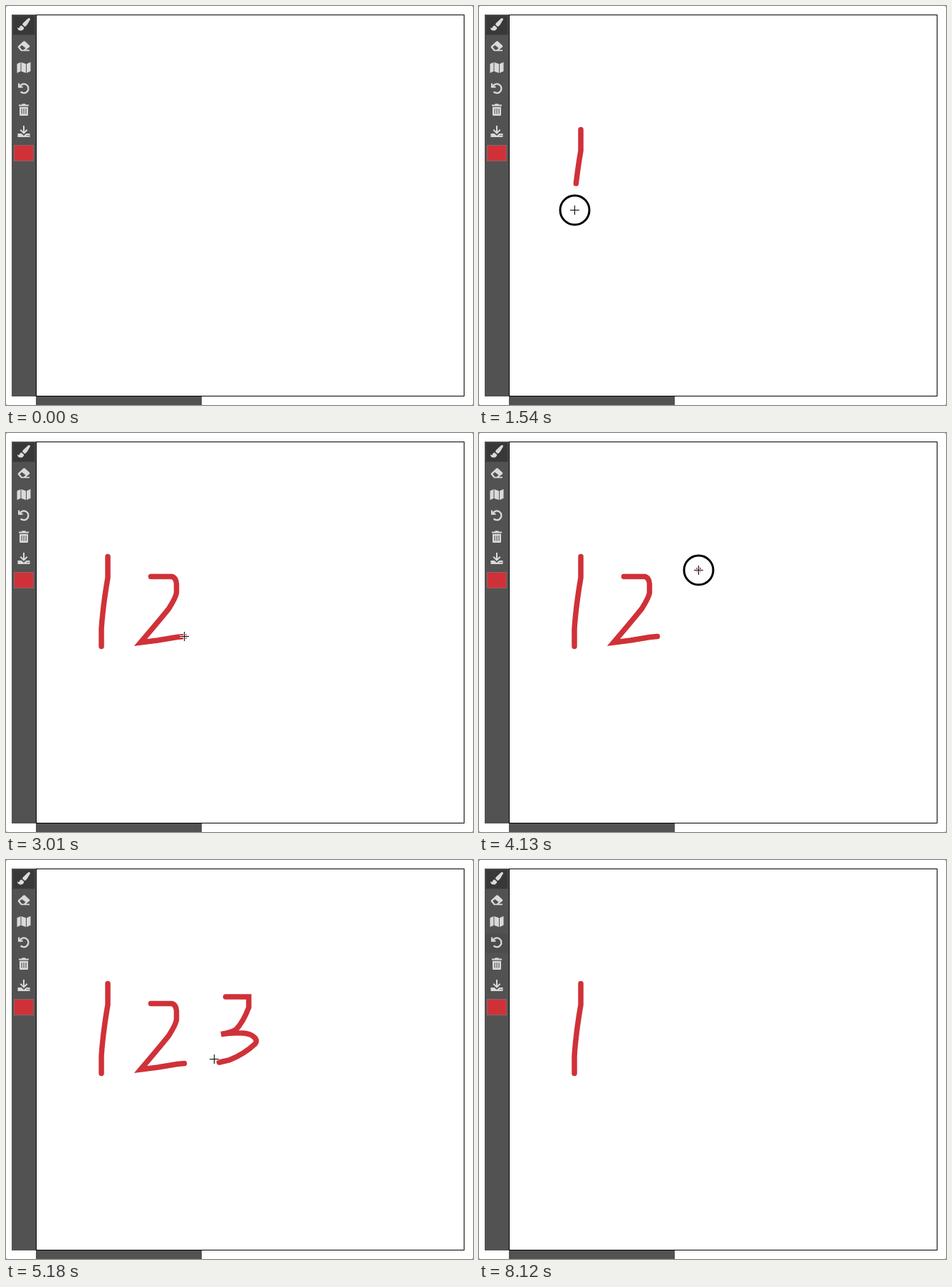
Write an HTML page that moves like this. It is 656 px wide and 560 px high and loops after 8.68 s.

```html
<!DOCTYPE html>
<html lang="en">
<head>
<meta charset="utf-8">
<title>Drawing board</title>
<style>
html, body { margin: 0; width: 100%; height: 100%; overflow: hidden; background: #fff; }
svg { display: block; width: 656px; height: 560px; }
.icon { fill: #dadada; fill-rule: evenodd; }
.button { fill: #383838; stroke: #474747; }
.ink { fill: none; stroke: #d03138; stroke-width: 7.5; stroke-linecap: round; stroke-miterlimit: 3.2; }
.halo { fill: none; stroke: #fff; }
.line { fill: none; stroke: #000; }
</style>
</head>
<body>
<svg viewBox="0 0 656 560">
  <rect width="656" height="560" fill="#888"/>
  <rect width="656" height="560" rx="2.5" fill="#fff"/>
  <rect x="8" y="12" width="34" height="536" fill="#525252"/>
  <rect x="42" y="548" width="233" height="12" fill="#525252"/>
  <rect x="42.5" y="12.5" width="601" height="535" fill="#fff" stroke="#000"/>
  <rect class="button" x="9.5" y="13.5" width="31" height="27"/>
  <rect class="button" id="hover" x="9.5" y="103.5" width="31" height="27"/>
  <g class="icon">
    <path d="M34 18.5C34 17 32 16.5 31 17.5C26 22 23.5 24 23 26L26 29C29 28.5 31 24 34 19Z
      M22 27.5C19.5 27.5 19 30 18.5 30.8C18 31.5 17 30.5 16 30C16 33 18 34.5 20.5 34.5C23.5 34.5 25.5 32.5 25.2 30.2Z"/>
    <path d="M17 56.5L24.5 49.5Q25.5 48.8 26.5 49.5L33 55.5Q33.7 56.5 33 57.5L28 61.5H33V63.3H21L17 58.6Q16.2 57.5 17 56.5Z
      M22.3 55L19.3 57.6L22.3 61.4H25L27.5 59Z"/>
    <path d="M15.5 81.2L20.5 79V91.8L15.5 94ZM21.5 79L28 81.2V94L21.5 91.8ZM29 81.2L34.5 78.8V91.6L29 94Z"/>
    <path d="M17 108.5H19.2V112.6H23.5V114.8H17Z"/>
    <path d="M19.3 112.9A6.4 6.4 0 1 1 20.6 120.4" fill="none" stroke="#dadada" stroke-width="2.3"/>
    <path d="M22 138L23 137.2H27L28 138.5H32V140.5H18V138.5H22ZM19 141.8H31V152.5Q31 154 29.5 154H20.5Q19 154 19 152.5Z
      M21.5 144V151.5H22.6V144ZM24.5 144V151.5H25.6V144ZM27.5 144V151.5H28.6V144Z"/>
    <path d="M24 168H26V176L29 173L30.4 174.5L25 179.7L19.6 174.5L21 173L24 176Z
      M16.5 179H21.5L25 182L28.5 179H33.5V184H16.5ZM29 181V182.3H30.2V181ZM31.2 181V182.3H32.4V181Z"/>
  </g>
  <rect x="11.5" y="195.5" width="27" height="22" fill="#d03138" stroke="#8c6468"/>
  <g id="inks">
    <path class="ink" d="M143 173.5V203Q136 244 134 275V299.5"/>
    <path class="ink" d="M203.5 201.5H233Q239 203 239.5 212V224Q239 230 229 246Q223 254 189 294L213 291L240 286.5L250.5 285.5"/>
    <path class="ink" d="M308.5 192H341V207Q333 228 323 238Q318 242 302 244.5Q317 242 334 243Q345 244 350 250Q353 254 350 258Q334 273 313 281L299.5 284"/>
  </g>
  <g id="pointer">
    <g id="ring"><circle class="halo" stroke-width="6"/><circle class="line" stroke-width="3"/></g>
    <g id="cross">
      <path class="halo" stroke-width="3" d="M-6.5 0H6.5M0-6.5V6.5"/>
      <path class="line" d="M-6.5 0H6.5M0-6.5V6.5"/>
    </g>
    <path id="hand" fill="#fff" stroke="#000" d="M-2 1.5Q-.7 0 .6 1.5V6.5Q2 5.2 3.5 6.5Q5 5.6 6 7.2
      Q8 6.6 8.3 8.5V12L6.8 15V17H0V15.5L-4.3 10Q-4.3 8-2.5 9L-2 9.5ZM1.6 11.5V14M3.6 11.5V14M5.6 11.5V14"/>
  </g>
</svg>
<script>
const LOOP = 8680, STEP = 70;
const el = id => document.getElementById(id);
const show = (node, on) => { node.style.display = on ? '' : 'none'; };
const mix = (a, b, u) => a + (b - a) * u;

// eased progress from time a to time b
function ease(t, a, b) {
  const u = Math.min(1, Math.max(0, (t - a) / (b - a)));
  return u * u * (3 - 2 * u);
}

// arrive / leave: pointer is at the stroke; down / up: pen contact; begin / end: pen moves
const strokes = [
  { arrive: 840, down: 1120, begin: 1300, end: 1600, up: 1680, leave: 1750, gone: LOOP },
  { arrive: 2240, down: 2240, begin: 2440, end: 2940, up: 3010, leave: 3150, gone: 7280 },
  { arrive: 3990, down: 4060, begin: 4130, end: 5030, up: 5040, leave: 5130, gone: 5880 }
];
strokes.forEach((s, i) => {
  s.path = el('inks').children[i];
  s.length = s.path.getTotalLength();
  s.drawn = t => ease(t, s.begin, s.end) * s.length;
  s.at = t => s.path.getPointAtLength(s.drawn(t));
});

const still = (x, y) => () => ({ x, y });
const undo = { arrive: 5670, leave: 7910, at: still(22, 113) };
const stops = [
  { leave: 70, at: still(160, 552) },
  ...strokes,
  undo,
  { arrive: 8050, at: still(233, 431) }
];
const clicks = [[5740, 5950], [6720, 6860], [7210, 7350]];

function pointerAt(t) {
  const next = stops.findIndex(s => s.arrive > t);
  if (next < 0) return stops[stops.length - 1].at(t);
  const a = stops[next - 1], b = stops[next];
  const p = a.at(t), q = b.at(t), u = ease(t, a.leave, b.arrive);
  return { x: mix(p.x, q.x, u), y: mix(p.y, q.y, u) };
}

function draw(now) {
  const t = Math.floor(now % LOOP / STEP) * STEP;

  for (const s of strokes) {
    show(s.path, t > s.down && t < s.gone);
    // ink trails the pointer by one step
    const ink = t < s.up ? s.drawn(t - STEP) : s.length;
    s.path.setAttribute('stroke-dasharray', ink + ' 999');
  }

  const { x, y } = pointerAt(t);
  const dragging = strokes.some(s => t >= s.down && t < s.up);
  const clicking = clicks.some(([a, b]) => t >= a && t < b);
  const onBar = x < 42;
  show(el('pointer'), t >= 70 && t < 8120);
  show(el('ring'), dragging || clicking);
  show(el('cross'), !onBar);
  show(el('hand'), onBar);
  for (const c of el('ring').children) c.setAttribute('r', clicking ? 28.5 : 20.5);
  const snap = v => onBar ? v : Math.floor(v) + .5;
  el('pointer').setAttribute('transform', `translate(${snap(x)} ${snap(y)})`);

  show(el('hover'), t >= undo.arrive);
  el('hover').setAttribute('opacity', mix(1, .2, ease(t, undo.leave, undo.leave + 3 * STEP)));
}

const start = performance.now();
function tick() {
  draw(performance.now() - start);
  requestAnimationFrame(tick);
}
tick();
</script>
</body>
</html>
```
